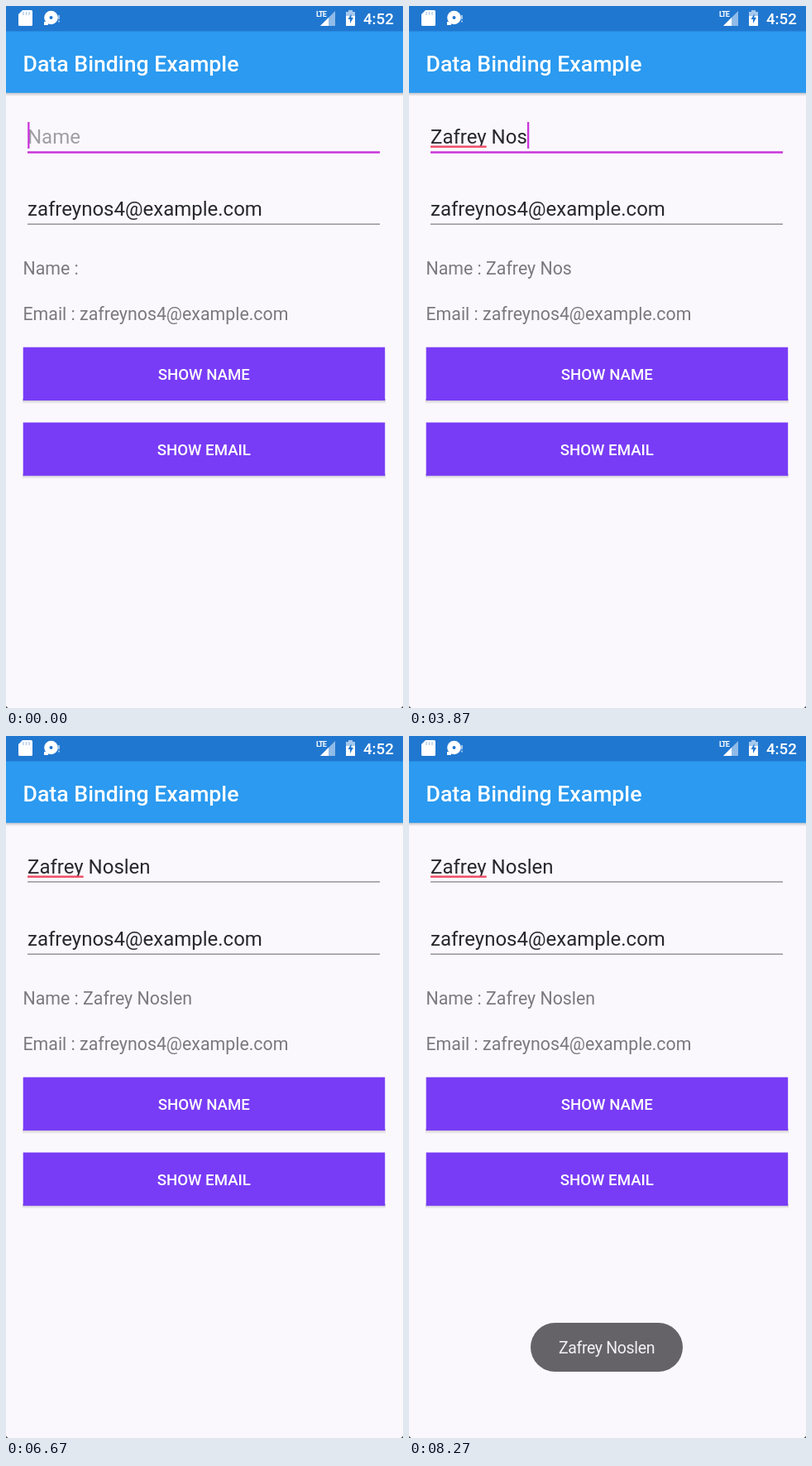
An HTML page for the animation above (8.34 s loop, 480 by 847 pixels).

```html
<!DOCTYPE html>
<html lang="en">
<head>
<meta charset="utf-8">
<title>Data Binding Example</title>
<style>
  html, body { margin: 0; width: 100%; height: 100%; overflow: hidden; background: #faf8fd; }
  svg { display: block; width: 100%; height: 100%; }
  text { font-family: Roboto, sans-serif; white-space: pre; }
  .medium { font-weight: 500; fill: #fff; }
  .input { font-size: 24px; fill: #28282b; }
  .label { font-size: 21.33px; fill: #7b797d; }
  .button { font-size: 18.67px; text-anchor: middle; }
  .toast { font-size: 19.5px; letter-spacing: -.35px; text-anchor: middle; fill: #f2f1f3; }
</style>
</head>
<body>
<svg viewBox="0 0 480 847">
  <defs>
    <linearGradient id="shade" x2="0" y2="1">
      <stop stop-color="#000" stop-opacity=".25"/>
      <stop offset="1" stop-color="#000" stop-opacity="0"/>
    </linearGradient>
  </defs>
  <rect width="480" height="847" fill="#faf8fd"/>
  <path d="M0 844.5V847H2.5ZM480 844.5V847H477.500Z" fill="#555"/>

  <!-- Status and app bars -->
  <rect y="104" width="480" height="5" fill="url(#shade)"/>
  <rect width="480" height="104.800" fill="#2b9af0"/>
  <rect width="480" height="30.500" fill="#2077d0"/>
  <g fill="#fff">
    <path d="M20 5H30.500Q32 5 32 6.500V22.500Q32 24 30.500 24H16.500Q15 24 15 22.500V10Z"/>
    <path d="M21 7v4M24.500 7v4M28 7v4" stroke="#b4d0ee" stroke-width="1.500"/>
    <circle cx="54.500" cy="14" r="8.300"/>
    <path d="M46 19h5v4h-5z"/>
    <circle cx="54.500" cy="14" r="2" fill="#2077d0"/>
    <path d="M64 11v5M64 17.500v2" stroke="#a6c8ec" stroke-width="1.800"/>
    <path d="M398 6V24H380Z" opacity=".5"/>
    <path d="M390 14V24H380Z"/>
    <text x="375" y="12.500" font-size="9" font-weight="700" letter-spacing="-.9">LTE</text>
    <path d="M414 5h5v2h3v5h-11V7h3Z" opacity=".6"/>
    <path d="M411 12h11v12h-11Z"/>
    <path d="M417.500 9.500l-4 6.500h2.500v5l4-7h-2.500Z" fill="#2077d0"/>
  </g>
  <text class="medium" x="432" y="22" font-size="18.67">4:52</text>
  <text class="medium" x="20.500" y="78.500" font-size="26.67">Data Binding Example</text>

  <!-- Form -->
  <text class="input" id="nameInput" x="26" y="166"></text>
  <rect id="misspelled" x="26" y="168.500" height="2.500" fill="#f0506a"/>
  <rect id="nameLine" x="26" width="426"/>
  <text class="input" x="26" y="253">zafreynos4@example.com</text>
  <rect id="emailLine" x="26" width="426"/>
  <rect id="cursor" width="2.300" height="32" fill="#cb35dc"/>
  <text class="label" id="nameLabel" x="20.500" y="324"></text>
  <text class="label" x="20.500" y="379">Email : zafreynos4@example.com</text>

  <!-- Buttons -->
  <rect x="20" y="474" width="439" height="6" fill="url(#shade)"/>
  <rect x="20.700" y="411.700" width="437.500" height="64.300" fill="#793cf6"/>
  <text class="medium button" x="239.300" y="451">SHOW NAME</text>
  <rect x="20" y="564.500" width="439" height="6" fill="url(#shade)"/>
  <rect x="20.700" y="502.500" width="437.500" height="64.300" fill="#793cf6"/>
  <text class="medium button" x="239.300" y="542">SHOW EMAIL</text>

  <g id="toast">
    <rect x="147" y="708" width="184" height="59" rx="29.500" fill="#656367"/>
    <text class="toast" x="239" y="745">Zafrey Noslen</text>
  </g>
</svg>
<script>
const LOOP = 8340;
const FULL_NAME = 'Zafrey Noslen';
const TYPE_START = 2200, KEY_INTERVAL = 180;
const TYPE_END = TYPE_START + KEY_INTERVAL * (FULL_NAME.length - 1);
const SPELLCHECK = 3680;
const EMAIL_FOCUS = 6000, BUTTON_FOCUS = 6500;
const TOAST_START = 7330, TOAST_FADE = 400;
const BLINK = 500, FIRST_BLINK = -360;

const $ = id => document.getElementById(id);
const clamp = (v, lo, hi) => Math.min(hi, Math.max(lo, v));

function set(id, attributes) {
  for (const [key, value] of Object.entries(attributes)) $(id).setAttribute(key, value);
}

function drawLine(id, y, focused) {
  set(id, focused
    ? { y: y - .5, height: 2.5, fill: '#cb35dc' }
    : { y: y - .5, height: 1.4, fill: '#8f8d92' });
}

function cursorVisible(t) {
  if (t >= BUTTON_FOCUS) return false;
  if (t >= TYPE_START && t < TYPE_END) return true;
  const start = t >= EMAIL_FOCUS ? EMAIL_FOCUS : t >= TYPE_END ? TYPE_END : FIRST_BLINK;
  return Math.floor((t - start) / BLINK) % 2 === 0;
}

function render(t) {
  const count = clamp(Math.floor((t - TYPE_START) / KEY_INTERVAL) + 1, 0, FULL_NAME.length);
  const typed = FULL_NAME.slice(0, count);
  const onEmail = t >= EMAIL_FOCUS && t < BUTTON_FOCUS;

  const input = $('nameInput');
  input.textContent = typed || 'Name';
  input.style.fill = typed ? '' : '#a09ea3';
  $('nameLabel').textContent = 'Name : ' + typed;

  const showError = t >= SPELLCHECK;
  set('misspelled', { width: showError ? input.getSubStringLength(0, 6) : 0 });
  drawLine('nameLine', 175.8, t < EMAIL_FOCUS);
  drawLine('emailLine', 263, onEmail);

  const textWidth = typed && !onEmail ? input.getComputedTextLength() : 0;
  set('cursor', {
    x: 26.2 + textWidth,
    y: onEmail ? 227 : 140,
    opacity: cursorVisible(t) ? 1 : 0
  });

  const fade = clamp((t - TOAST_START) / TOAST_FADE, 0, 1);
  set('toast', { opacity: 1 - (1 - fade) ** 2 });
}

const began = performance.now();
function tick() {
  render((performance.now() - began) % LOOP);
  requestAnimationFrame(tick);
}
tick();
</script>
</body>
</html>
```
